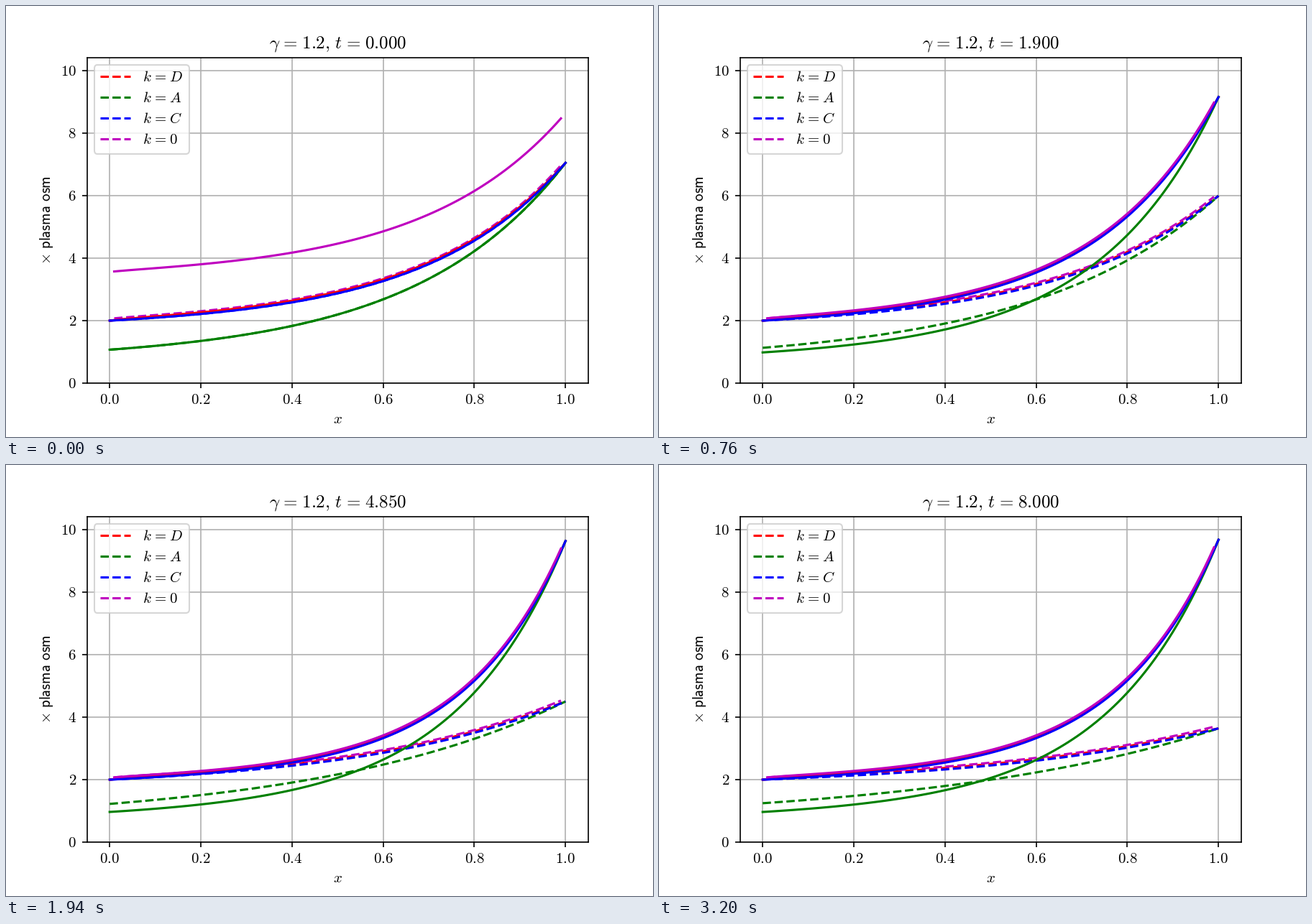
A matplotlib script for the animation above (3220 ms loop, 900 px wide and 600 px high).

```python
import numpy as np
import matplotlib.pyplot as plt
from matplotlib.animation import FuncAnimation

plt.rcParams.update({
    "font.family": "Liberation Serif",
    "mathtext.fontset": "cm",
    "figure.subplot.bottom": 0.125,
})

FRAMES, INTERVAL, DT = 161, 20, 0.05
EQ = r"\hspace{0.1}=\hspace{0.1}"

x = np.linspace(0, 1, 101)
inner = slice(1, -1)


def settle(t, start, end, rate):
    """Exponential approach from start to end."""
    return end + (start - end) * np.exp(-rate * t)


def drift(t, start, span, mid, width):
    """Part of a logistic step, shifted to begin at start."""
    def logistic(s):
        return 1 / (1 + np.exp((mid - s) / width))
    return start + span * (logistic(t) - logistic(0))


def rise(start, end, rate, linear):
    shape = linear * x + (1 - linear) * np.expm1(rate * x) / np.expm1(rate)
    return start + (end - start) * shape


def profiles(start, end, rate_c, rate_a):
    """Curves D, A, C and 0; D and 0 run just above C."""
    a = rise(start, end, rate_a, 0.04)
    c = rise(2.0, end, rate_c, 0.05)
    d = c + 0.048 * (1 - np.exp(-x / 0.06)) * (1 - np.exp((x - 1) / 0.06))
    zero = c + 0.09 - 0.03 * np.exp(-x / 0.05)
    return [d, a, c, zero[inner]]


def dashed(t):
    return profiles(start=drift(t, 1.07, 0.21, 2.2, 1.3),
                    end=drift(t, 7.05, -5.85, 1.7, 2.55),
                    rate_c=drift(t, 3.38, -1.66, 2.6, 1.6),
                    rate_a=drift(t, 3.10, -2.35, 1.3, 2.0))


def solid(t):
    curves = profiles(start=settle(t, 1.07, 0.965, 0.95),
                      end=settle(t, 7.05, 9.68, 0.85),
                      rate_c=drift(t, 3.38, 1.27, 2.05, 0.65),
                      rate_a=settle(t, 3.10, 4.20, 0.72))
    curves[3] += settle(t, 1.5, 0, 20)
    return curves


fig, ax = plt.subplots(figsize=(6, 4), dpi=150)
grids = [x, x, x, x[inner]]
lines = []
for style in ("--", "-"):
    for name, color, grid in zip("DAC0", "rgbm", grids):
        label = f"$k{EQ}{name}$" if style == "--" else None
        lines += ax.plot(grid, grid, color + style, label=label)

ax.set_xlim(-0.05, 1.05)
ax.set_ylim(0, 10.414)
xticks = np.arange(6) / 5
yticks = range(0, 11, 2)
ax.set_xticks(xticks, [f"${v:.1f}$" for v in xticks])
ax.set_yticks(yticks, [f"${v}$" for v in yticks])
ax.set_xlabel("$x$")
ax.set_ylabel(r"$\times\ \mathsf{plasma\ osm}$")
ax.grid(True)
ax.legend(loc="upper left", labelspacing=0.45)
title = ax.set_title("", pad=6.7)


def update(frame):
    t = frame * DT
    for line, y in zip(lines, dashed(t) + solid(t)):
        line.set_ydata(y)
    title.set_text(rf"$\gamma{EQ}1.2{{,}}\ t{EQ}{t:.3f}$")
    return lines + [title]


anim = FuncAnimation(fig, update, frames=FRAMES, interval=INTERVAL,
                     repeat=True, repeat_delay=0)
plt.show()
```
